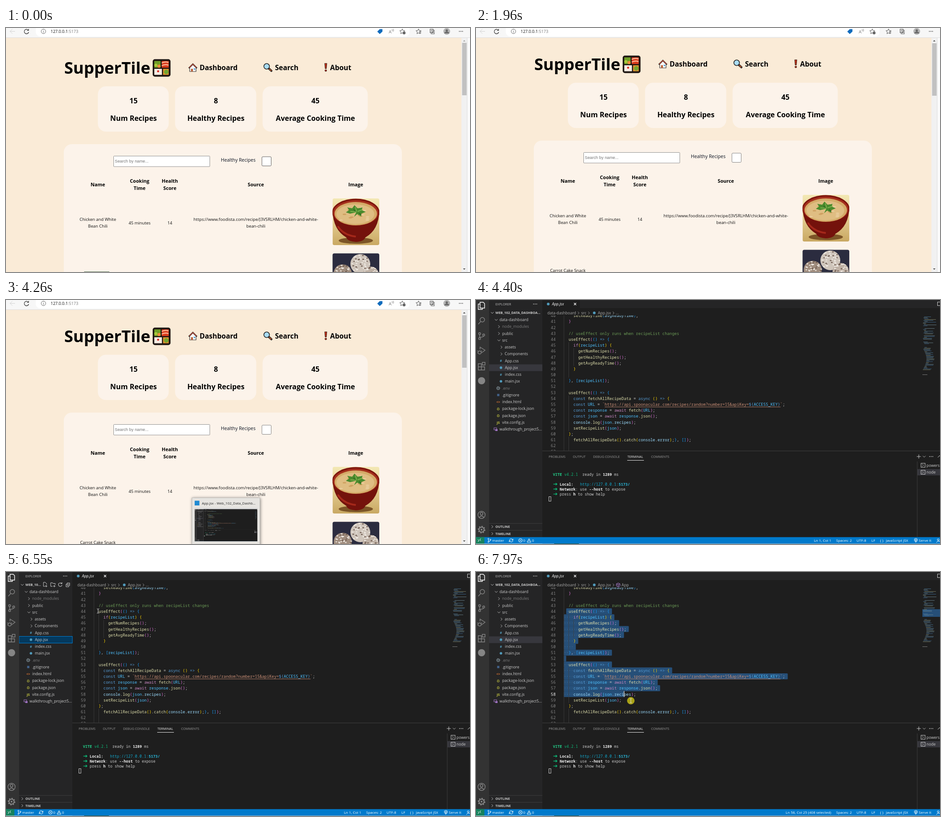
An HTML page for the animation above (8000 ms loop, 1028 px wide and 544 px high).

```html
<!DOCTYPE html>
<html lang="en">
<head>
<meta charset="utf-8">
<title>Recipe dashboard</title>
<style>
html, body { margin: 0; width: 100%; height: 100%; overflow: hidden; background: #faebd7 }
svg { display: block; width: 1028px; height: 544px }
text { font-family: "Open Sans", "Noto Sans", sans-serif }
.mono { font-family: "Noto Sans Mono", "DejaVu Sans Mono", monospace }
.arial { font-family: "Liberation Sans", sans-serif }
.pop { filter: drop-shadow(1px 1px 3px #0007) }
</style>
</head>
<body>
<svg id="stage" viewBox="0 0 1028 544"></svg>
<script>
const esc = s => s.replace(/&/g, '&amp;').replace(/</g, '&lt;').replace(/>/g, '&gt;');
const B = 'font-weight="700"', MID = 'text-anchor="middle"', END = 'text-anchor="end"', MONO = 'class="mono"';
const rawText = (x, y, s, size, fill, extra = '') => `<text x="${x}" y="${y}" font-size="${size}" fill="${fill}" ${extra}>${s}</text>`;
const text = (x, y, s, ...rest) => rawText(x, y, esc(s), ...rest);
const rect = (x, y, w, h, fill, extra = '') => `<rect x="${x}" y="${y}" width="${w}" height="${h}" fill="${fill}" ${extra}/>`;
const circle = (x, y, r, fill, extra = '') => `<circle cx="${x}" cy="${y}" r="${r}" fill="${fill}" ${extra}/>`;
const oval = (x, y, rx, ry, fill) => `<ellipse cx="${x}" cy="${y}" rx="${rx}" ry="${ry}" fill="${fill}"/>`;
const line = (d, stroke, w = 1, extra = '') => `<path d="${d}" fill="none" stroke="${stroke}" stroke-width="${w}" ${extra}/>`;
const shape = (d, fill, extra = '') => `<path d="${d}" fill="${fill}" ${extra}/>`;
const ring = (x, y, r, stroke, w = 1) => circle(x, y, r, 'none', `stroke="${stroke}" stroke-width="${w}"`);
const frame = (x, y, w, h, stroke, lw = 1) => rect(x, y, w, h, 'none', `stroke="${stroke}" stroke-width="${lw}"`);
const dots = (x, y, fill, gap = 3.5) => [-1, 0, 1].map(i => circle(x + i * gap, y, .9, fill)).join('');
const right = (x, y, c = '#ccc') => line(`M${x - 1.5} ${y - 3}l3 3l-3 3`, c, .9);
const down = (x, y, c = '#ccc') => line(`M${x - 3} ${y - 1.5}l3 3l3 -3`, c, .9);
let seed = 7;
const rnd = () => (seed = seed * 16807 % 2147483647) / 2147483647;

// ---- Recipe page ----
const CARD = '#fcf3ea';

function emoji() {
  return rect(325, 69.5, 39.5, 39, '#1d1512', 'rx="5"') + rect(328.5, 73.5, 14, 15, '#6f9d26') + rect(345, 73.5, 15.5, 15, '#d83b1d') +
    circle(332, 83, 3.5, '#a9c83a') + circle(339, 85, 3.5, '#f08a3c') +
    line('M345 78q8 -4 15 -1M345 84q8 -4 15 -1', '#ffb090', 2.5) +
    rect(328.5, 91, 17, 13.5, '#f8ede4') + circle(337, 96.5, 2.3, '#d8271c') +
    rect(348, 91, 12.5, 13.5, '#e0912f') + circle(355, 98, 5, '#73a630') +
    shape('M407 88l7 -7l7 7v9h-14z', '#fbf8f5', 'stroke="#333" stroke-width="1.2"') +
    line('M405 89.5l9 -9l9 9', '#222', 2.8) + line('M406 88.5l8 -8l8 8', '#e8553c', 1.1) +
    rect(410, 91, 4, 6, '#b85c32') + rect(416, 90, 3, 3, '#4ba3dc') +
    line('M582 90l6 5.5', '#222', 4.5, 'stroke-linecap="round"') + line('M583 91l5 4.5', '#c0582b', 2.2) +
    circle(577.5, 85.5, 6.2, '#a9dcf4', 'stroke="#222" stroke-width="1.6"') +
    shape('M706.3 79h4.4l-1 11.5h-2.4z', '#d8391d', 'stroke="#32120c" stroke-width="1.2"') +
    circle(708.5, 94.8, 1.8, '#d8391d', 'stroke="#32120c" stroke-width="1.2"');
}

function soup() {
  let s = rect(723.5, 380, 103.5, 104, 'url(#mat)') + oval(775, 474, 38, 7, '#7c5527') +
    shape('M723.5 408Q725 450 754 467Q757 476 775 477Q793 476 796 467Q826 450 827 408z', '#74120c') +
    line('M735 442Q748 462 775 465', '#a5281a', 4) +
    oval(775, 411, 52.5, 30.5, '#7e150d') + oval(775, 412, 50, 28, '#a5301c') + oval(775, 414, 47, 26, '#d4ab68') + oval(774, 415, 42, 22, '#dfbd82');
  for (let i = 0; i < 16; i++) s += oval(742 + rnd() * 64, 399 + rnd() * 32, 4, 1.6, i % 2 ? '#cfa162' : '#e9cc9b');
  return s + shape('M776 411l-14 3l-9 -3l7 -5l-4 -6l11 2l5 -7l7 7l11 -2l-2 6l9 4l-10 4l0 6l-9 -5l-7 6z', '#4a8a2c') +
    line('M776 410l-13 -1M777 409l-3 -10M779 409l11 -4', '#8abb56', 1.4) + line('M770 404l4 5M782 413l5 3', '#2c6120', 1.5);
}

function snowballs() {
  let s = rect(723.5, 502.5, 103.5, 104, '#2b2c3f', 'rx="4"');
  [[785, 526, 22, '#cfc5bb'], [746, 547, 20, '#a08d7e'], [808, 550, 18, '#bfb1a5']].forEach(([x, y, r, c]) => {
    s += circle(x, y, r, c);
    for (let i = 0; i < 45; i++) {
      const a = rnd() * 6.3, d = Math.sqrt(rnd()) * r * .95;
      s += oval(x + Math.cos(a) * d, y + Math.sin(a) * d, 2, 1.2, i % 3 ? '#eee8e1' : '#6d594e');
    }
  });
  return s;
}

function pageBody() {
  let s = text(129, 101.5, 'SupperTile', 36, '#000', B) + emoji();
  [[429, 'Dashboard'], [596, 'Search'], [718, 'About']].forEach(([x, t]) => s += text(x, 93.6, t, 15.5, '#000', B));
  [[204, 361, '15', 'Num Recipes'], [375, 555, '8', 'Healthy Recipes'], [569, 802, '45', 'Average Cooking Time']]
    .forEach(([a, b, n, t]) => {
      const x = (a + b) / 2;
      s += rect(a - .5, 130, b - a, 101, CARD, 'rx="18"') + text(x, 167.7, n, 15.9, '#000', B + MID) +
        text(x, 206.7, t, 15.9, '#000', B + MID);
    });
  s += rect(128, 259, 749, 400, CARD, 'rx="18"') +
    rect(238.5, 285.5, 213, 23.5, '#fff', 'stroke="#767676" stroke-width=".8" rx="1"') +
    text(241, 300.3, 'Search by name...', 9.24, '#757575', 'class="arial"') +
    text(476, 298, 'Healthy Recipes', 10.4, '#0b1220') +
    rect(567, 287, 20.5, 20.5, '#fff', 'id="check" stroke-width=".9" rx="2"');
  [[203.5, 353, 'Name'], [296, 344.5, 'Cooking'], [296, 361, 'Time'], [363, 344.5, 'Health'], [363, 361, 'Score'],
    [553.5, 353, 'Source'], [775, 353, 'Image']].forEach(([x, y, t]) => s += text(x, y, t, 10.7, '#000', B + MID));
  [[203.5, 430.3, 'Chicken and White'], [203.5, 444.6, 'Bean Chili'], [296, 437.5, '45 minutes'], [363, 437.5, '14'],
    [553.5, 430.3, 'https://www.foodista.com/recipe/J3VSRLHM/chicken-and-white-'], [553.5, 444.6, 'bean-chili'],
    [203.5, 552, 'Carrot Cake Snack']].forEach(([x, y, t]) => s += text(x, y, t, 9.33, '#111', MID));
  return s + `<g clip-path="url(#photo)">${soup()}</g>` + snowballs();
}

function browserBar() {
  const g = '#555';
  return rect(0, 0, 1028, 21.5, '#f7f7f7') + rect(66, -10, 828, 29, '#fff', 'rx="10"') + rect(0, 21, 1028, 1, '#dedede') +
    line('M20 7.5H9M14 2.5l-5 5l5 5', '#d2d2d2') + line('M49.5 5a5 5 0 1 0 .8 4M50 2v3.5h-3.5', '#333', 1.2) +
    ring(83, 7.5, 5, '#666') + line('M83 6.8v3.6M83 4.4v1.2', '#666') +
    rawText(99, 11, '127.0.0.1<tspan fill="#777">:5173</tspan>', 9, '#111') +
    shape('M822.5 8l5.5 -5.5h6v5.5l-6 5.5z', '#0f6cbd') + text(848, 11.5, 'A', 9.5, '#777') + line('M855 3q2 2 0 4M857.5 2q3 3 0 6', '#777', .9) +
    [[878, 1], [914, 0]].map(([x, plus]) => line(`M${x} 2l1.7 3.6l4 .5l-3 2.7l.8 4l-3.5 -2l-3.5 2l.8 -4l-3 -2.7l4 -.5z`, g, 1) +
      (plus ? circle(x + 4, 11, 3.2, '#666') : line(`M${x + 1} 8h5M${x + 2} 11h4`, g))).join('') +
    frame(939.5, 2.5, 7, 8, g) + frame(942, 5, 7, 8, g) + line('M945.5 7v4M943.5 9h4', g) +
    circle(976.5, 7.5, 7.5, '#b5b5b5') + circle(976.5, 5.5, 2.6, '#6b6b6b') + shape('M971 12a5.5 4 0 0 1 11 0z', '#6b6b6b') +
    dots(1008, 7.5, '#333');
}

const pageArt = () => rect(0, 0, 1028, 544, '#faebd7') + `<g id="scroll">${pageBody()}</g>` +
  rect(1009, 22, 13, 522, '#f1f1f1') + rect(1022, 22, 6, 522, '#fbfbfb') + rect(1021.5, 22, .8, 522, '#d8d8d8') +
  shape('M1012.5 30h5.5l-2.75 -3z', '#a3a3a3', 'id="up"') + shape('M1012.5 536h5.5l-2.75 3z', '#505050') +
  rect(1010.5, 33, 10, 117, '#c1c1c1', 'id="thumb"') + browserBar();

// ---- Code editor ----
const CH = 5.335, X0 = 194.5, FIRST = 40;
const lineY = n => 91 + (n - 44) * 13.18;
const code = `    setReadyTime(avgReadyTime);
  }

  // useEffect only runs when recipeList changes
  useEffect(() => {
    if(recipeList) {
      getNumRecipes();
      getHealthyRecipes();
      getAvgReadyTime();
    }
    
  }, [recipeList]);

  useEffect(() => {
    const fetchAllRecipeData = async () => {
    const URL = \`https://api.spoonacular.com/recipes/random?number=15&apiKey=\${ACCESS_KEY}\`;
    const response = await fetch(URL);
    const json = await response.json();
    console.log(json.recipes);
    setRecipeList(json);
  };
    fetchAllRecipeData().catch(console.error);}, []);
`.split('\n');
const token = /(\/\/.*)|(https:[^$]*|`)|(\$\{|\}(?=`))|([([{])|([)\]}])|(const|async|=>)|\b(if|await)\b|(\w+(?=\()|fetchAll\w+)|\b(recipeList|URL|response|json|ACCESS_KEY)\b|(\w+)/g;
const hues = ['#6a9955', '#ce9178', '#569cd6', , , '#569cd6', '#c586c0', '#dcdcaa', '#4fc1ff', '#9cdcfe'];
const bracketHues = ['#ffd700', '#da70d6', '#179fff'];
let depth = 2;

const colour = s => s.replace(token, (m, ...groups) => {
  const k = groups.findIndex(v => v !== undefined);
  const c = k === 3 ? bracketHues[depth++ % 3] : k === 4 ? bracketHues[--depth % 3] : hues[k];
  return `<tspan fill="${c}">${esc(m)}</tspan>`;
});

function codeText() {
  let s = '';
  const guide = (col, a, b) => s += rect(X0 + col * CH, lineY(a) - 10, .8, (b - a + 1) * 13.18, '#404040');
  guide(0, 40, 63); guide(2, 45, 50); guide(4, 46, 48); guide(2, 54, 59); guide(2, 61, 63);
  code.forEach((l, i) => {
    const y = lineY(FIRST + i), t = l.trim();
    s += text(176.5, y, String(FIRST + i), 8.89, '#858585', MONO + END);
    if (t) s += rawText(X0 + l.search(/\S/) * CH, y, colour(t), 8.89, '#d4d4d4', MONO);
  });
  return s + text(176.5, lineY(63), '63', 8.89, '#858585', MONO + END) + rect(X0 + 17 * CH, lineY(55) + 2, 73 * CH, .8, '#ce9178');
}

const gear = (x, y, r, c) => ring(x, y, r * .7, c, r * .25) + circle(x, y, r * .25, c) +
  ring(x, y, r * .9, c, r * .3).replace('/>', ` stroke-dasharray="${r * .35}"/>`);

function activityBar() {
  const g = '#858585', w = 1.4;
  return rect(0, 0, 29, 530, '#333') +
    line('M9 9V5h7l3 3v10h-10zM9 9H5v12h9v-3', '#fff', w) +
    ring(14, 44, 5, g, w) + line('M10.5 48l-5.5 6', g, w) +
    ring(8, 75, 2.2, g, w) + ring(17, 78, 2.2, g, w) + ring(8, 86, 2.2, g, w) + line('M8 77v7M17 80q0 3 -9 3', g, w) +
    line('M9 110v-5l11 7l-8 6', g, w) + ring(8, 117, 3.5, g, w) + line('M3 113l2 2M3 118h2M13 113l-2 2', g, w) +
    line('M5 142h7v14h-7zM5 149h14v7h-7M14 139h6v6h-6z', g, w) + circle(12.3, 180, 8, g) +
    ring(12.3, 479, 8, g, w) + ring(12.3, 476.5, 3, g, w) + line('M7 485q5 -7 10.6 0', g, w) + gear(12.3, 512, 8, g);
}

const files = [[52, 'v', 'data-dashboard'], [58, '>', 'node_modules', 1], [58, '>', 'public'], [58, 'v', 'src'],
  [63.5, '>', 'assets'], [63.5, '>', 'Components'], [64, '#', 'App.css'], [64, 'dot', 'App.jsx'], [64, '#', 'index.css'],
  [64, 'dot', 'main.jsx'], [58, 'gear', '.env', 1], [58, 'box', '.gitignore'], [58, '<>', 'index.html'], [58, '{}', 'package-lock.json'],
  [58, '{}', 'package.json'], [58, 'JS', 'vite.config.js'], [52, 'pic', 'walkthrough_project5...']];
const iconHue = { '#': '#519aba', '<>': '#e37933', '{}': '#cbcb41', JS: '#cbcb41' };

function fileIcon(kind, x, y) {
  switch (kind) {
    case 'v': return down(x + 1.5, y);
    case '>': return right(x + 1.5, y);
    case 'dot': return circle(x, y, 2.8, '#519aba');
    case 'gear': return gear(x, y, 4, '#8a9ba3');
    case 'box': return rect(x - 2.5, y - 2.5, 5, 5, '#41618a');
    case 'pic': return frame(x - 3.5, y - 3, 6, 4.5, '#a074c4') + rect(x - .5, y, 5, 4, '#a074c4');
    default: return text(x, y + 2.8, kind, 7.5, iconHue[kind], B + MID);
  }
}

function explorer() {
  let s = rect(29, 0, 118, 529, '#252526') + text(43, 11.6, 'EXPLORER', 7.25, '#bbb') + dots(131, 9, '#ccc') +
    rect(29, 143.5, 118, 15, '#37373d', 'id="row"') + down(36, 28.5);
  files.forEach(([x, icon, name, dim], i) => {
    const y = 44.2 + i * 15.24;
    s += fileIcon(icon, x - 8.7, y) + text(x, y + 3, name, 8.62, dim ? '#7d7d7d' : '#ccc');
  });
  s += `<g id="fullName">${text(43, 31.4, 'WEB_102_DATA_DASHBOA...', 7.45, '#ccc', B)}</g><g id="tools">` +
    text(43, 31.4, 'WEB_10...', 7.45, '#ccc', B) +
    line('M86 32h-3v-9h4l3 3v2M89 29v5M86.5 31.5h5', '#ccc') + line('M103 32h-4v-8h4l1 1.5h5v3M107 29v5M104.5 31.5h5', '#ccc') +
    line('M123.5 26a4 4 0 1 0 .6 3M124 23v3h-3', '#ccc', 1.1) + frame(135.5, 24.5, 5.5, 5.5, '#ccc') + line('M135 27h-2v6h6v-2M137 27.3h3', '#ccc') + '</g>';
  [[505.5, 'OUTLINE'], [521, 'TIMELINE']].forEach(([y, t]) =>
    s += rect(29, y - 7.8, 118, .8, '#444') + right(36, y) + text(43, y + 2.7, t, 7.3, '#ccc', B));
  return s;
}

function tabs() {
  return rect(147, 0, 881, 18, '#252526') + rect(147, 0, 83, 18.5, '#1e1e1e') + rect(147, 18, 842, 16.5, '#1e1e1e') +
    circle(160, 9, 3, '#519aba') + text(168.5, 12, 'App.jsx', 8.4, '#fff', 'font-style="italic"') +
    line('M217 6.5l5 5M222 6.5l-5 5', '#fff', 1.1) + frame(1022.5, 4.5, 8, 8, '#ccc') +
    text(158, 32, 'data-dashboard', 8.6, '#a9a9a9') + right(227, 29, '#a9a9a9') + text(233, 32, 'src', 8.6, '#a9a9a9') +
    right(250, 29, '#a9a9a9') + circle(262, 28.7, 3, '#519aba') + text(270, 32, 'App.jsx', 8.6, '#a9a9a9') + right(304.5, 29, '#a9a9a9') +
    `<g id="crumbDots">${text(309.5, 32, '...', 8.6, '#a9a9a9')}</g><g id="crumbApp">` +
    line('M315 24.5l4 2v4.5l-4 2.2l-4 -2.2v-4.5zM311 26.5l4 2l4 -2M315 28.5v4.5', '#b180d7') + text(322.5, 32, 'App', 8.6, '#a9a9a9') + '</g>';
}

function minimap() {
  let s = '';
  const tints = ['#4c7da0', '#6f8a94', '#3e6c99', '#8b8b6a'];
  for (let i = 0; i < 62; i++) {
    const y = 37 + i * 2, gap = [11, 12, 20, 26, 27, 31, 32, 33].includes(i), inner = i > 35;
    if (gap || i > 59) continue;
    const x = 990 + (inner ? 8 * Math.sin((i - 35) / 24 * Math.PI) : rnd() * 4);
    s += rect(x, y, 4 + rnd() * (inner ? 15 : 26), 1, tints[i % 4], 'opacity=".75"');
  }
  return s + rect(989, 166, 11, 1, '#777');
}

function terminal() {
  const f = 8.36, c = '#ccc', green = '#23d18b';
  let s = rect(147, 336, 881, 193, '#1e1e1e') + rect(147, 336, 881, .8, '#484848');
  [[161, 'PROBLEMS'], [214.5, 'OUTPUT'], [259.5, 'DEBUG CONSOLE'], [335.5, 'TERMINAL'], [388, 'COMMENTS']].forEach(([x, t]) =>
    s += text(x, 352, t, 7.2, t === 'TERMINAL' ? '#eee' : '#999'));
  s += rect(335, 357, 37, 1, '#e7e7e7') + line('M981 344.5v9M976.5 349h9', c) + down(993, 349) + dots(1008.5, 349, c) + line('M1023 351l4 -4l4 4', c) +
    rect(977.3, 360, .8, 169, '#444') + rect(978, 377, 50, 14, '#37373d');
  [[368.5, 'powers'], [384, 'node']].forEach(([y, t]) => s += frame(986, y - 4.5, 9, 9, c) + right(990, y) + text(998, y + 3, t, 8.5, c));
  const put = (x, y, t, fill = c, extra = '') => s += text(x, y, t, f, fill, MONO + extra);
  put(170.5, 391.5, 'VITE', green, B); put(195.7, 391.5, 'v4.2.1', '#0dbc79');
  put(235.8, 391.5, 'ready in'); put(281, 391.5, '1289', '#eee', B); put(306, 391.5, 'ms');
  [410.5, 421.5, 432.6].forEach(y => s += line(`M171.5 ${y}h8M176.5 ${y - 2.5}l3 2.5l-3 2.5`, '#0dbc79', 1.3));
  put(185.5, 413.6, 'Local:', '#eee', B); put(230.7, 413.6, 'http://127.0.0.1:', '#11a8cd'); put(316, 413.6, '5173/', '#29b8db', B);
  put(185.5, 424.7, 'Network', '#eee', B); put(220.6, 424.7, ': use'); put(250.8, 424.7, '--host', '#eee', B); put(286, 424.7, 'to expose');
  put(185.5, 435.8, 'press'); put(215.6, 435.8, 'h', '#eee', B); put(225.7, 435.8, 'to show help');
  return s + frame(161.5, 438.5, 4.5, 10, '#ccc');
}

function statusBar() {
  const w = '#fff';
  let s = rect(0, 528.7, 1028, 14.8, '#007acc') + rect(0, 528.7, 18.5, 14.8, '#16825d') + rect(0, 543.3, 1028, .7, '#d5e4ee') + rect(173, 543, 55, 1, '#31563f') +
    line('M4 534l3 2.5l-3 2.5M11 532l-3 2.5l3 2.5', w) + ring(27.5, 532.5, 1.3, w) + ring(27.5, 539.5, 1.3, w) + ring(32, 534.5, 1.3, w) + line('M27.5 534v4M32 536q0 2 -4 2', w) +
    line('M74 535a4 4 0 0 1 7.5 0M82 537a4 4 0 0 1 -7.5 0M82 532.5v3h-3M73.5 539.5v-3h3', w) +
    ring(98.5, 536, 4, w) + line('M97 534.5l3 3M100 534.5l-3 3', w) + line('M117.5 532l4.5 8h-9zM117.5 535v3', w);
  [[36, 'master'], [104.5, '0'], [124, '0'], [798, 'Spaces: 2'], [843, 'UTF-8'], [876, 'LF'], [895, '{ }'], [908, 'JavaScript JSX'], [981, 'Serve It']]
    .forEach(([x, t]) => s += text(x, 539, t, 8, w));
  return s + `<text id="position" x="787" y="539" font-size="8" fill="#fff" text-anchor="end"></text>` +
    ring(974.5, 535, 3.5, w) + ring(974.5, 535, 1.3, w) + line('M974.5 536v5', w) + ring(1024, 534.5, 2, w) + line('M1020 541q4 -6 8 -2', w);
}

const editorArt = () => rect(147, 0, 881, 544, '#1e1e1e') + '<g id="marks"></g>' + codeText() + '<g id="caret"></g>' + tabs() +
  rect(989, 83, 39, 17, '#264f78', 'id="mapMark"') + minimap() + terminal() + explorer() + activityBar() + statusBar();

// ---- Window previews, tooltip, pointer ----
const popup = (id, x, title, badge, art) => `<g id="${id}">` +
  rect(x, 441, 150.5, 110, '#e6e4e0', 'class="pop" stroke="#b5b3af" stroke-width=".8"') + badge + text(x + 22, 456, title, 7.75, '#222') +
  `<g clip-path="url(#${id}Clip)">${rect(x + 6, 463, 139, 75, '#ddd')}<use href="#${art}" transform="translate(${x + 6} 466.5) scale(.135)"/></g></g>`;
const clip = (id, ...box) => `<clipPath id="${id}">${rect(...box, '#000')}</clipPath>`;

document.getElementById('stage').innerHTML = `<defs>
  <linearGradient id="mat" x2="0" y2="1"><stop stop-color="#f3e8b4"/><stop offset=".5" stop-color="#e3cb90"/><stop offset="1" stop-color="#c9a862"/></linearGradient>
  ${clip('webClip', 452, 463, 139, 75) + clip('appClip', 418, 463, 139, 75)}
  <clipPath id="photo">${rect(723.5, 380, 103.5, 104, '#000', 'rx="4"')}</clipPath>
  <g id="pageArt">${pageArt()}</g><g id="editorArt">${editorArt()}</g></defs>
  <use id="page" href="#pageArt"/><use id="editor" href="#editorArt"/>` +
  rect(173, 543, 56, 1, '#4d6b52', 'id="strip"') +
  popup('web', 446.5, 'Vite + React and 3 more pages ...', circle(457.7, 453, 5.5, '#1b86c8'), 'pageArt') +
  popup('app', 412, 'App.jsx - Web_102_Data_Dashb...', rect(418, 447.5, 10.5, 10.5, '#1f8ad2'), 'editorArt') +
  `<g id="tip" opacity=".62">${rect(420.5, 412.5, 202, 24.5, '#fff', 'class="pop" stroke="#777"') +
    text(424, 422, 'Vite + React and 3 more pages - Personal - Brightsea', 7.8, '#575757') + text(424, 433, 'Opal', 7.8, '#575757')}</g>` +
  `<g id="arrow">${shape('M0 0v9.5l2.2 -2l1.5 3.4l1.3 -.6l-1.5 -3.3h2.9z', '#fff', 'stroke="#222" stroke-width=".8"')}</g>` +
  `<g id="beam">${circle(0, 0, 8.3, '#a9a216', 'id="press"') + line('M-2.5 -5q2.5 0 2.5 1.5v7q0 1.5 -2.5 1.5M2.5 -5q-2.5 0 -2.5 1.5M2.5 5q-2.5 0 -2.5 -1.5', '#ddd', 1)}</g>`;

// ---- Timeline: each entry holds until the next ----
const LOOP = 8000;
const scrolls = [[0, 0], [1400, 6], [1530, 8]];
const popups = [[0, ''], [2830, 'web', .5], [2960, 'web', 1], [3830, 'app', .5], [3970, 'app', 1], [4400, '']];
const pointer = [[0, ''], [540, 'arrow', 655, 312], [680, 'arrow', 760, 328], [820, 'arrow', 753, 309], [1680, 'arrow', 745, 350],
  [1820, 'arrow', 660, 480], [1960, ''], [5120, 'beam', 972, 522], [5270, 'beam', 475, 450], [5430, 'beam', 505, 257],
  [5710, 'beam', 478, 240], [5850, 'beam', 374, 170], [5990, 'beam', 288, 124], [6130, 'beam', 235, 100], [6270, 'beam', 212, 91],
  [6410, 'beam', 206, 88], [6550, 'beam', 204, 87], [6700, 'beam', 203.5, 86.5], [7250, 'beam', 208, 88], [7400, 'beam', 220, 90],
  [7540, 'beam', 234, 93], [7680, 'beam', 250, 96], [7820, 'beam', 268, 102], [7970, 'beam', 343, 287]];
const carets = [[0], [6830, 44, 1], [7250, 44, 3], [7400, 44, 5], [7540, 44, 8], [7680, 44, 11], [7820, 45, 14], [7970, 58, 25]];

const $ = id => document.getElementById(id);
const at = (list, t) => list.findLast(e => e[0] <= t);
const show = (id, on) => $(id).style.display = on ? '' : 'none';
let drawn;

function select(caret) {
  if (caret === drawn) return;
  drawn = caret;
  const [, row, col] = caret;
  let marks = '', count = 0;
  for (let n = 44; n <= row; n++) {
    const l = code[n - FIRST], from = n === 44 ? 1 : 0, to = n === row ? col : l.length + 1;
    if (to <= from) continue;
    count += to - from;
    marks += rect(X0 + from * CH, lineY(n) - 10, (to - from) * CH, 13.3, '#264f78', 'rx="1.5"') +
      text(X0 + from * CH, lineY(n), l.slice(from, to).replace(/[^ ]/g, '\u00a0').replace(/ /g, '·'), 8.89, '#5d7a97', MONO);
  }
  $('marks').innerHTML = marks;
  $('caret').innerHTML = row ? rect(X0 + col * CH - .5, lineY(row) - 10, 1.4, 13, '#ddd') + text(176.5, lineY(row), String(row), 8.89, '#d6d6d6', MONO + END) : '';
  // The status bar trails a drag by one column.
  const lag = count ? 1 : 0;
  $('position').textContent = !row ? 'Ln 1, Col 1' : `Ln ${row}, Col ${col + 1 - lag}` + (count > lag ? ` (${count - lag} selected)` : '');
  show('mapMark', count);
  $('mapMark').setAttribute('height', Math.max(2, (row - 43) * 17 / 15));
}

function draw(now) {
  const t = now % LOOP, y = at(scrolls, t)[1], caret = at(carets, t), coding = t >= 4400;
  $('scroll').setAttribute('transform', `translate(0 ${-y})`);
  $('thumb').setAttribute('y', y ? 34 : 33);
  $('up').setAttribute('fill', y ? '#505050' : '#a3a3a3');
  $('check').setAttribute('stroke', t < 540 ? '#4f4f4f' : '#767676');
  show('page', !coding);
  show('editor', coding);
  show('strip', t < 1400);

  const [, open, alpha] = at(popups, t);
  for (const id of ['web', 'app']) {
    show(id, open === id);
    $(id).setAttribute('opacity', alpha || 1);
  }
  show('tip', t >= 3390 && t < 3690);

  const focus = t >= 4580 && !caret[1];
  $('row').setAttribute('fill', focus ? '#04395e' : '#37373d');
  $('row').setAttribute('stroke', focus ? '#007fd4' : 'none');
  show('tools', focus);
  show('fullName', !focus);
  show('crumbDots', !caret[1]);
  show('crumbApp', caret[1]);
  select(caret);

  const [, kind, px, py] = at(pointer, t);
  for (const id of ['arrow', 'beam']) show(id, kind === id);
  if (kind) $(kind).setAttribute('transform', `translate(${px} ${py})`);
  show('press', t >= 6830);
}

let start;
function tick(now) {
  start ??= now;
  draw(now - start);
  requestAnimationFrame(tick);
}
draw(0);
requestAnimationFrame(tick);
</script>
</body>
</html>
```
